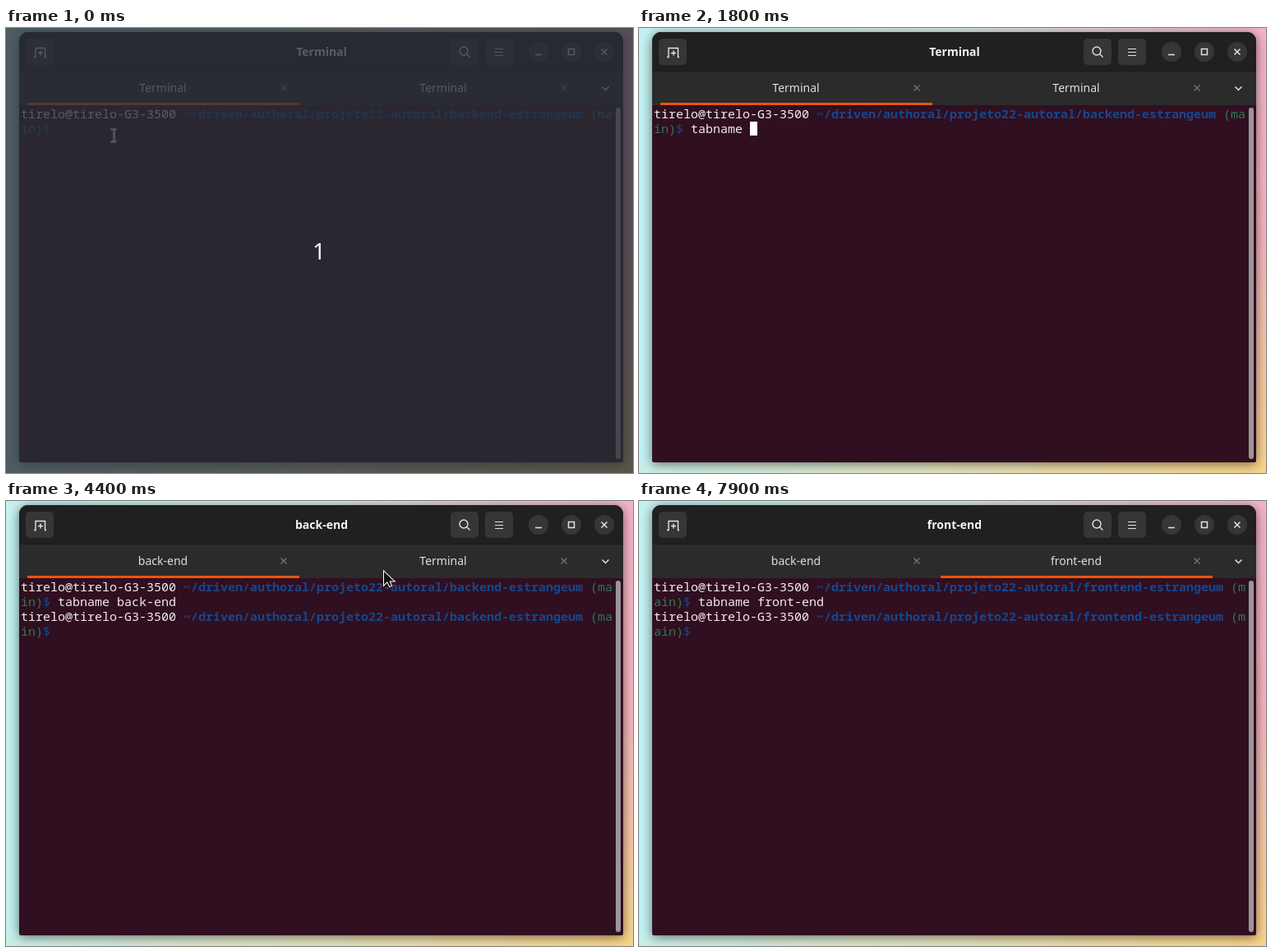
Write an HTML page with a canvas that moves like this. It is 763 by 542 pixels and loops after 8000 ms.

```html
<!DOCTYPE html>
<html lang="en">
<head>
<meta charset="utf-8">
<title>Terminal tabs</title>
<style>
html, body { margin: 0; width: 100%; height: 100%; overflow: hidden; }
canvas { display: block; }
</style>
</head>
<body>
<canvas id="stage" width="763" height="542"></canvas>
<script>
const W = 763, H = 542, LOOP = 8000, CELL = 9, ROW = 18, COLS = 80;
const ctx = document.getElementById('stage').getContext('2d');
const SANS = '"Noto Sans", sans-serif', MONO = '15px "Noto Sans Mono", monospace';
const WHITE = '#f0ecee', BLUE = '#16478d', GREEN = '#2a7a58', ORANGE = '#e95410';

// Key times in ms; the last one of each list is Enter.
const tabs = [
  { dir: 'backend', name: 'back-end', x: 26,
    keys: [600, 750, 850, 950, 1150, 1300, 1450, 1650, 2000, 2200, 2400, 2600, 2800, 2950, 3050, 3150, 3400] },
  { dir: 'frontend', name: 'front-end', x: 367,
    keys: [5300, 5380, 5460, 5520, 5580, 5720, 5780, 6500, 6560, 6640, 6720, 6800, 6880, 6960, 7020, 7080, 7140, 7280] }
];
const SWITCH = 4700;
const enterTime = tab => tab.keys[tab.keys.length - 1];
const titleOf = (tab, t) => t >= enterTime(tab) ? tab.name : 'Terminal';

function box(x, y, w, h, color, r = 0) {
  ctx.fillStyle = color;
  ctx.beginPath();
  ctx.roundRect(x, y, w, h, r);
  ctx.fill();
}

function path(d, color, width = 1.5) {
  ctx.strokeStyle = color;
  ctx.lineWidth = width;
  ctx.stroke(new Path2D(d));
}

function label(text, x, y, font, color) {
  ctx.font = font;
  ctx.fillStyle = color;
  ctx.textAlign = 'center';
  ctx.fillText(text, x, y);
}

function gradient(x, y, ...colors) {
  const g = ctx.createLinearGradient(0, 0, x, y);
  colors.forEach((c, i) => g.addColorStop(i / (colors.length - 1), c));
  return g;
}

function drawDesktop() {
  box(0, 0, W, H, gradient(W, 0, '#c4f2f2', '#dceee6', '#f6b6c8'));
  box(W / 2, 0, W / 2, H, gradient(0, H, '#f5b3c900', '#f8cba000', '#f9d58c'));
  box(752, 0, 11, H, gradient(0, H, '#f4b4ca', '#f5b7bd', '#f9d68d'));
  box(0, 529, W, 13, gradient(W, 0, '#c9efe9', '#e6e4bd', '#fad488'));
}

function drawWindow(t, active) {
  ctx.save();
  ctx.shadowColor = 'rgba(0,0,0,.55)';
  ctx.shadowBlur = 14;
  ctx.shadowOffsetY = 2;
  box(16, 5, 735, 524, '#300f20', [11, 11, 2, 2]);
  ctx.restore();
  box(16, 5, 735, 48, '#202020', [11, 11, 0, 0]);
  box(16, 53, 735, 41, '#2b2b2b');
  box(16, 52, 735, 1, '#191919');

  for (const x of [24, 541, 583]) box(x, 13, 34, 32, '#363636', 5);
  for (const x of [648, 688, 728]) box(x - 12, 17, 24, 24, '#363636', 12);
  const ink = '#e2e2e2';
  path('M34 35.5H36V24.5H47.5V35.5H49 M42 27.5V33.5 M39 30.5H45', ink, 1.4);
  path('M562 28a5 5 0 1 0-10 0a5 5 0 1 0 10 0 M560.5 31.5L564.5 35.5', ink, 1.4);
  path('M595 25.5H605 M595 29.5H605 M595 33.5H605', ink, 1.2);
  path('M644 32.5H652', ink);
  path('M684.5 25.5H691.5V32.5H684.5Z', ink);
  path('M724.5 25.5L731.5 32.5 M731.5 25.5L724.5 32.5', ink);
  path('M725.5 71.5L729.5 75.5L733.5 71.5', ink);

  label(titleOf(active, t), 384, 34, 'bold 14px ' + SANS, '#f4f4f4');
  for (const tab of tabs) {
    const x = tab.x + 165;
    label(titleOf(tab, t), x, 78, '14px ' + SANS, '#dedede');
    path(`M${x + 143.5} 69.5l7 7 M${x + 150.5} 69.5l-7 7`, '#777', 1.2);
  }
  box(active.x, 91, 331, 3, ORANGE);
  box(742, 97, 6, 428, '#9c9597', 3);
}

function drawTerminal(t, tab) {
  let pos = 0;
  const write = (text, color, weight = '') => {
    ctx.font = `${weight} ${MONO}`;
    ctx.fillStyle = color;
    ctx.textAlign = 'left';
    for (const ch of text) {
      ctx.fillText(ch, 18 + pos % COLS * CELL, 110 + Math.floor(pos / COLS) * ROW);
      pos++;
    }
  };
  const prompt = () => {
    write('tirelo@tirelo-G3-3500 ', WHITE, '500');
    write(`~/driven/authoral/projeto22-autoral/${tab.dir}-estrangeum `, BLUE, 'bold');
    write('(main)', GREEN);
    write('$ ', BLUE);
  };

  const pressed = tab.keys.filter(k => k <= t);
  prompt();
  write(('tabname ' + tab.name).slice(0, pressed.length), WHITE);
  if (t >= enterTime(tab)) {
    pos = Math.ceil(pos / COLS) * COLS;
    prompt();
  }

  const last = pressed.length ? pressed[pressed.length - 1] : tab === tabs[1] ? SWITCH : 100;
  if (t >= 100 && (t - last) % 1200 < 600)
    box(18 + pos % COLS * CELL, 96 + Math.floor(pos / COLS) * ROW, CELL, ROW - 1, '#fff');
}

function glide(t, start, end, from, to) {
  const p = Math.min(1, Math.max(0, (t - start) / (end - start)));
  const e = p * p * (3 - 2 * p);
  return from.map((v, i) => v + (to[i] - v) * e);
}

// The pointer hides while keys are being typed.
function drawPointer(t) {
  if (t >= tabs[0].keys[0] && t < 4000 || t >= tabs[1].keys[0]) return;
  const [x, y] = t < SWITCH
    ? glide(t, 4000, 4550, [131, 131], [532, 76])
    : glide(t, SWITCH + 50, 5150, [532, 76], [354, 192]);
  ctx.save();
  ctx.translate(Math.round(x), Math.round(y));
  if (y < 94) {
    const arrow = 'M0 0V16L4 12L7 18L9 17L6.5 11.5H12Z';
    path(arrow, '#fff', 2);
    ctx.fillStyle = '#111';
    ctx.fill(new Path2D(arrow));
  } else {
    const beam = 'M-3.5 -7.5H3.5 M.5 -7.5V7.5 M-3.5 7.5H3.5';
    path(beam, '#777', 3.5);
    path(beam, '#eee', 1.6);
  }
  ctx.restore();
}

function draw(t) {
  const active = tabs[t < SWITCH ? 0 : 1];
  drawDesktop();
  drawWindow(t, active);
  drawTerminal(t, active);
  drawPointer(t);
  if (t < 100) {
    box(0, 0, W, H, 'rgba(41,47,55,.76)');
    label('1', 381, 282, '28px ' + SANS, '#f2f2f2');
  }
}

const start = performance.now();
function tick() {
  draw((performance.now() - start) % LOOP);
  requestAnimationFrame(tick);
}
tick();
</script>
</body>
</html>
```
